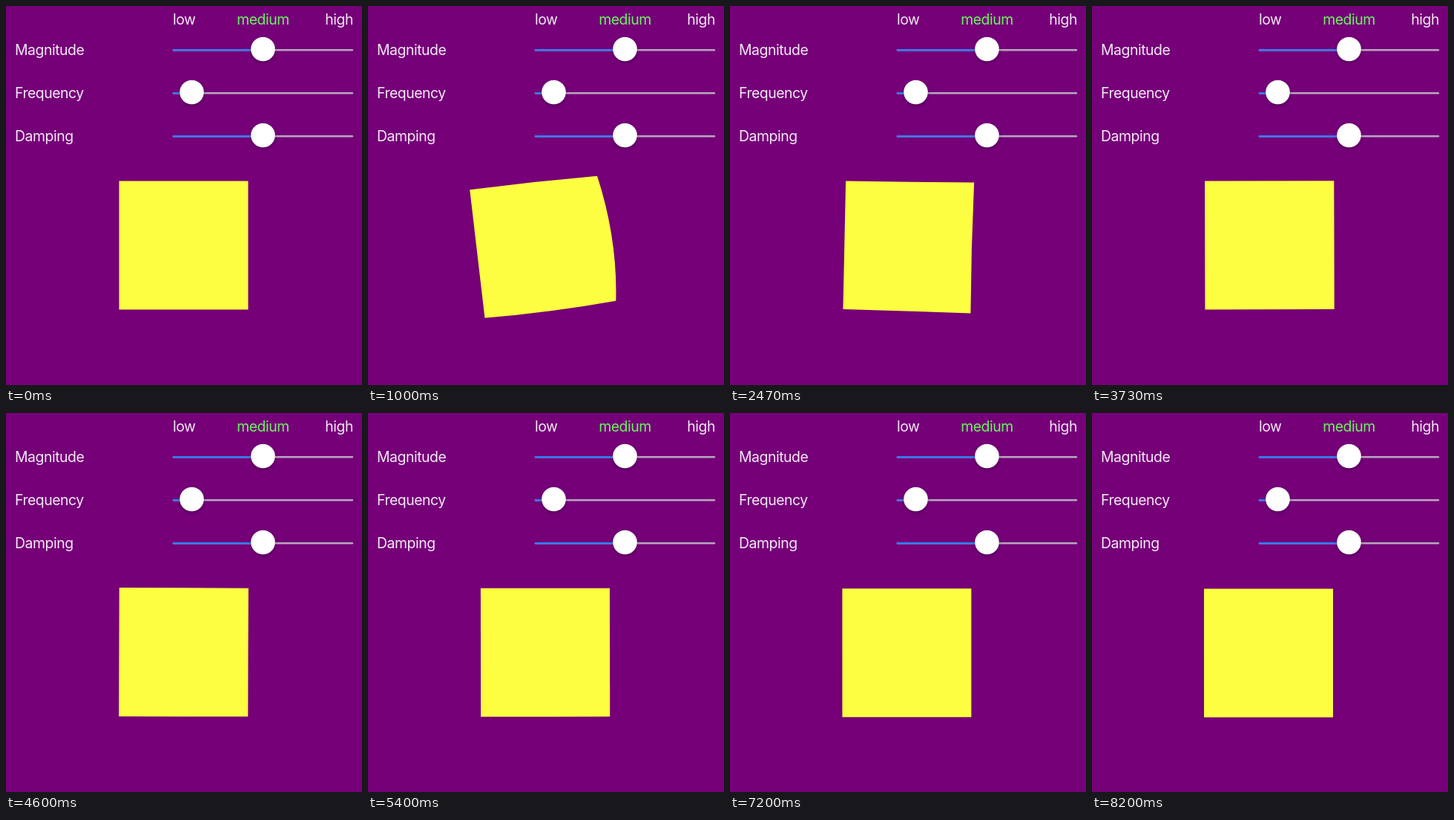
An HTML page for the animation above (8.27 s loop, 480x510 px).

```html
<!DOCTYPE html>
<html lang="en">
<head>
<meta charset="utf-8">
<title>Wobbling square</title>
<style>
  html, body { margin: 0; width: 100%; height: 100%; overflow: hidden; background: #750078; }
  svg { display: block; width: 480px; height: 510px; }
  text { font: 400 19.4px Inter, "Liberation Sans", sans-serif; letter-spacing: -.45px; fill: #f5e9f6; }
  .on { fill: #6af55e; }
  .track { stroke: #b8a7be; stroke-width: 2.4; stroke-linecap: round; }
  .fill { stroke: #2f7df6; stroke-width: 2.6; stroke-linecap: round; }
  .knob { fill: #fff; filter: drop-shadow(0 2px 2px rgba(30, 0, 40, .4)); }
</style>
</head>
<body>
<svg viewBox="0 0 480 510">
  <rect width="480" height="510" fill="#750078"/>
  <text x="225" y="25">low</text>
  <text x="346.5" y="25" text-anchor="middle" class="on">medium</text>
  <text x="468" y="25" text-anchor="end">high</text>
  <g id="sliders"></g>
  <path id="body" fill="#fdfe42"/>
</svg>
<script>
  const LOOP = 8270, STEP = 200 / 3;
  const START = 0.87, OMEGA = 1.8 * 2 * Math.PI;

  // Each corner: rest point, then swing and overtone strength in x and y.
  const corners = [
    { x: 152.5, y: 235.5, sx: -16.2, ox: -6.3, sy: 15.5, oy: -10.5 },
    { x: 326.5, y: 235.5, sx: -20.3, ox: 1.4, sy: -6.5, oy: -5.5 },
    { x: 326.5, y: 408.5, sx: 8, ox: 4.5, sy: -9.7, oy: -18.2 },
    { x: 152.5, y: 408.5, sx: 6.6, ox: -4.5, sy: 14.5, oy: -7.4 }
  ];
  // Outward bend of the top, right, bottom and left edges.
  const bends = [[0, -2], [17.5, 0], [0, 5], [0, 0]];

  const sliders = [["Magnitude", 58, 346.5], ["Frequency", 116, 250.5], ["Damping", 174, 346.5]];
  document.getElementById("sliders").innerHTML = sliders.map(([name, y, x]) => `
    <text x="12" y="${y + 8}">${name}</text>
    <path class="track" d="M226 ${y + 1.2}H467"/>
    <path class="fill" d="M226 ${y + 1.2}H${x}"/>
    <circle class="knob" cx="${x}" cy="${y}" r="16.3"/>`).join("");

  const shape = document.getElementById("body");

  function outline(sec) {
    const t = Math.max(0, sec - START);
    const fade = Math.exp(-t);
    const swing = Math.sin(OMEGA * t), over = Math.sin(2 * OMEGA * t);
    const drift = Math.max(0, sec - 4.4) / 3.8;
    const bend = Math.exp(-t / 0.8) * swing;

    const pts = corners.map(c => [
      c.x + fade * (c.sx * swing + c.ox * over) - 1.5 * drift,
      c.y + fade * (c.sy * swing + c.oy * over) + drift
    ]);
    return pts.reduce((d, p, i) => {
      const q = pts[(i + 1) % 4];
      const mid = [0, 1].map(k => (p[k] + q[k]) / 2 + bends[i][k] * bend);
      return `${d}Q${mid} ${q}`;
    }, `M${pts[0]}`) + "Z";
  }

  const origin = performance.now();
  function draw(now) {
    const t = Math.max(0, now - origin) % LOOP;
    const tick = Math.floor((t + 1) / STEP);
    shape.setAttribute("d", outline(tick * STEP / 1000));
    requestAnimationFrame(draw);
  }
  draw(origin);
</script>
</body>
</html>
```
